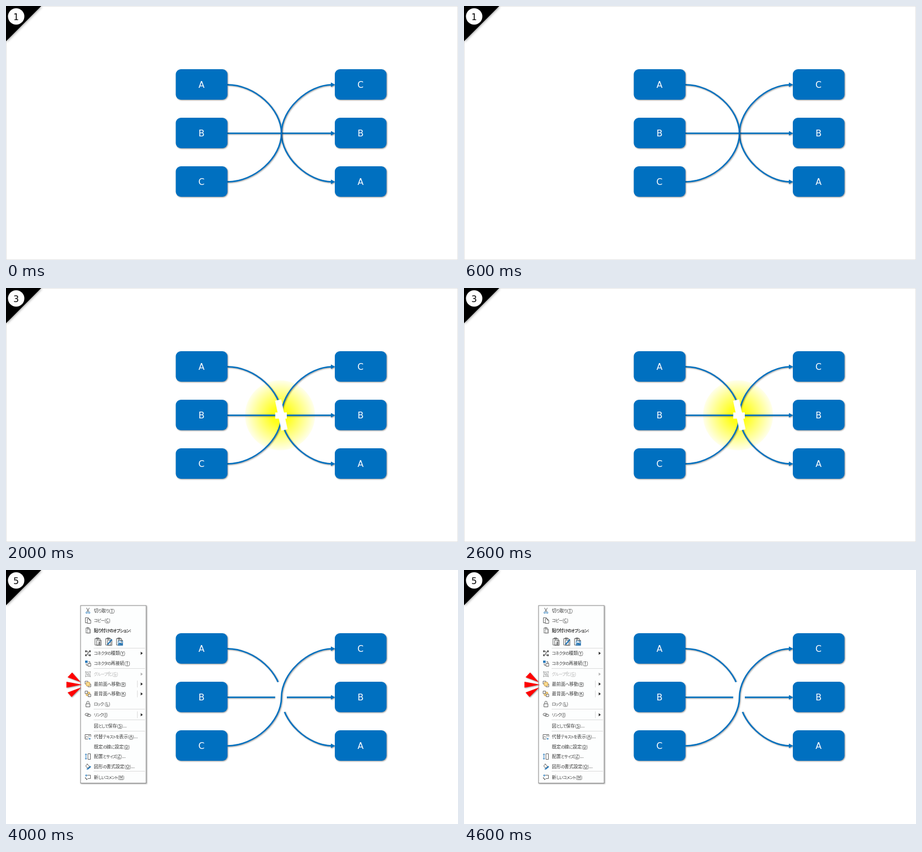
Animation of 800 by 450 pixels, one loop 5 s. Source, as an HTML page:

```html
<!DOCTYPE html>
<html lang="ja">
<head>
<meta charset="utf-8">
<title>Crossing connectors</title>
<style>
html, body { margin: 0; width: 100%; height: 100%; overflow: hidden; background: #fff; }
svg { display: block; width: 800px; height: 450px; }

/* Each step lasts one second of the five second loop. */
.s1-3, .s1-4, .s2, .s2-4, .s3-5, .s4-5, .s5, .num { animation: 5s step-end infinite; }
.s1-3 { animation-name: s1-3; }
.s1-4 { animation-name: s1-4; }
.s2   { animation-name: s2; }
.s2-4 { animation-name: s2-4; }
.s3-5 { animation-name: s3-5; }
.s4-5 { animation-name: s4-5; }
.s5   { animation-name: s5; }
.num  { animation-name: num; animation-delay: calc((var(--n) - 6) * 1s); }
@keyframes s1-3 { 0% { visibility: visible } 60%, 100% { visibility: hidden } }
@keyframes s1-4 { 0% { visibility: visible } 80%, 100% { visibility: hidden } }
@keyframes s2   { 0%, 40%, 100% { visibility: hidden } 20% { visibility: visible } }
@keyframes s2-4 { 0%, 80%, 100% { visibility: hidden } 20% { visibility: visible } }
@keyframes s3-5 { 0% { visibility: hidden } 40%, 100% { visibility: visible } }
@keyframes s4-5 { 0% { visibility: hidden } 60%, 100% { visibility: visible } }
@keyframes s5   { 0% { visibility: hidden } 80%, 100% { visibility: visible } }
@keyframes num  { 0% { visibility: visible } 20%, 100% { visibility: hidden } }

.shadow { filter: drop-shadow(1.4px 1.6px 1px rgba(0, 0, 0, .42)); }
.wire { fill: none; stroke: #0070c0; stroke-width: 2.5; }
.blue { fill: #0070c0; }
.label, .num { font: 15.5px "DejaVu Sans", Verdana, sans-serif; text-anchor: middle; }
.label { fill: #fff; }
.bar { fill: none; stroke-width: 11; }

.menu text { font: 8px "Noto Sans CJK JP", "Noto Sans CJK", sans-serif; fill: #3a3a3a; }
.menu .bold { font-weight: 700; }
.menu .off { fill: #b0b0b0; }
.menu .off-icon { opacity: .45; }
.kana { font-size: 7.2px; font-feature-settings: "palt"; letter-spacing: -.6px; }
.key { text-decoration: underline; }
.rule { stroke: #dcdcdc; fill: none; }
.ico { fill: none; stroke: #555; stroke-width: .9; }
.ico .b { stroke: #1f74b8; }
.ico .y { stroke: #d9a23c; fill: #f8dc94; }
.ico .w { fill: #fff; }
.ico .fb { fill: #1f74b8; stroke: none; }
.ico .fg { fill: #555; stroke: none; }
</style>
</head>
<body>
<svg viewBox="0 0 800 450">
  <defs>
    <radialGradient id="glow">
      <stop offset="0" stop-color="#ff0"/>
      <stop offset=".25" stop-color="#ff0" stop-opacity=".88"/>
      <stop offset="1" stop-color="#ff0" stop-opacity=".08"/>
    </radialGradient>
    <path id="head" class="blue" d="M582.5 0l-7.5-3.9v7.8z"/>
    <g id="rise">
      <path class="wire" d="M392 311.5C440 311.5 487.5 268.5 487.5 225.5S535 139.5 577 139.5"/>
      <use href="#head" y="139.5"/>
    </g>
    <g id="clip">
      <path class="y" d="M-5-5.5H4V6H-5z"/>
      <path class="w" d="M-2.5-7H1.5V-4.5H-2.5z"/>
      <path class="w" d="M-2-2.5H6V6.5H-2z"/>
    </g>
  </defs>

  <rect width="800" height="450" fill="#fff"/>
  <rect class="s1-3" x=".5" y=".5" width="799" height="449" fill="none" stroke="#e4e4e4"/>

  <circle class="s2-4" cx="485" cy="225.5" r="62" fill="url(#glow)"/>

  <g class="shadow">
    <path class="wire" d="M392 139.5C440 139.5 487.5 182.5 487.5 225.5S535 311.5 577 311.5M392 225.5H577"/>
    <use href="#head" y="225.5"/>
    <use href="#head" y="311.5"/>
  </g>
  <g class="s1-4"><use class="shadow" href="#rise"/></g>
  <g id="boxes"></g>

  <path id="bars" class="bar s2" stroke="#000" d="M481.7 198.5L492.9 251.5M476.5 226H497"/>
  <path class="bar s3-5" stroke="#fff" d="M481.7 198.5L492.9 251.5M476.5 226H497"/>
  <g class="s5"><use class="shadow" href="#rise"/></g>

  <g class="shadow" style="filter:drop-shadow(1.5px 1.5px 2px rgba(0,0,0,.4))"><path d="M0 0H62.5L0 62.5z"/></g>
  <circle cx="18" cy="18.5" r="14.5" fill="#fff"/>
  <g id="numbers"></g>

  <g class="menu s4-5">
    <rect x="132" y="63" width="116" height="314.500" fill="#fdfefe" stroke="#8c8c8c" style="filter:drop-shadow(1.5px 1.5px 1px rgba(0,0,0,.4))"/>
    <g id="rows"></g>
  </g>

  <g class="s5"><path class="shadow" fill="#f00" d="M117 181.500L109 190 132 198.500zM107 198V208.500L134 203zM109 217L116 225 133 208z"/></g>
</svg>

<script>
const byId = id => document.getElementById(id);

const box = (x, y, name) =>
  `<rect class="blue shadow" x="${x}" y="${y}" width="91.5" height="54" rx="9"/>
   <text class="label" x="${x + 45.5}" y="${y + 33}">${name}</text>`;
byId("boxes").innerHTML = ["A", "B", "C"].map((name, i, all) =>
  box(300.5, 112 + 86 * i, name) + box(582, 112 + 86 * i, all[2 - i])).join("");

byId("numbers").innerHTML = [1, 2, 3, 4, 5].map(n =>
  `<text class="num" style="--n:${n}" x="18" y="24.5">${n}</text>`).join("");

const icons = {
  cut: `<path d="M-2.5-5L1.5 2.5M2.500-5L-1.5 2.5"/><circle class="b" cx="-2.2" cy="3.6" r="1.4"/><circle class="b" cx="2.2" cy="3.6" r="1.4"/>`,
  copy: `<path d="M-1 4H-4.500V-5H1V-3"/><path class="w" d="M-1-3H2.500L5-.5V5H-1zM2.500-3V-.5H5"/>`,
  paste: `<use href="#clip" transform="scale(.75)"/>`,
  wire: `<path d="M-3-3.500H0V3.500H3M3-3.500L-3 3.500"/><path class="fg" d="M-5-5h3v3h-3zM2-5h3v3H2zM-5 2h3v3h-3zM2 2h3v3H2z"/>`,
  rejoin: `<path class="fb" d="M-5-5h4.500v4h-4.500z"/><path class="w" d="M0 0h5v5H0z"/><path d="M-3 0V3H0M1-3H3.500V0"/>`,
  group: `<path d="M-4-4H4V4H-4z"/><path d="M-2.500-2.500H1V1H-2.500zM-.5-.5H2.700V2.700H-.5z"/><path class="fg" d="M-5-5h2v2h-2zM3-5h2v2H3zM-5 3h2v2h-2zM3 3h2v2H3z"/>`,
  front: `<path d="M-5-5H0V0H-5zM0 0H5V5H0z"/><path class="y" d="M-3-3H3.200V3.200H-3z"/>`,
  back: `<path class="y" d="M-3-3H3.200V3.200H-3z"/><path class="w" d="M-5-5H-.5V-.5H-5zM.5.5H5V5H.5z"/>`,
  lock: `<path d="M-3.500-.5H3.500V5H-3.500zM-2-.5V-3A2 2 0 0 1 2-3V-.5"/>`,
  link: `<rect x="-5" y="-2.500" width="6.500" height="4" rx="2"/><rect x="-1.500" y="-1" width="6.500" height="4" rx="2"/>`,
  alt: `<path d="M5 0V-4H-5V4H0M-5 2L-2-1 1 2"/><circle cx="2" cy="-1.800" r=".7"/><path class="b" d="M1 3.500H5M3 2V5"/>`,
  size: `<path d="M0-5H4.500V5H0z"/><path class="b" d="M-3.500-4.500V4.500M-5-3L-3.500-5-2-3M-5 3L-3.500 5-2 3"/>`,
  format: `<path d="M-4-1L-1-4 3 0-1 3zM-2-5L1-2"/><path class="fb" d="M4.500-1L5.500 1 0 5.500-3 5 0 3z"/>`,
  note: `<path d="M-1-3.500H4.500V2.500H0L-2.500 5V2.500H-4.500V0"/><path class="b" d="M-5-3H-1M-3-5V-1"/>`
};

// [centre y, caption, access key, ending, icon, flags: m = submenu, s = split, b = bold, o = off]
const rows = [
  [72, "切り取り", "T", "", "cut"],
  [89.5, "コピー", "C", "", "copy"],
  [107, "貼り付けのオプション:", "", "", "paste", "b"],
  [147.500, "コネクタの種類", "Y", "", "wire", "m"],
  [165.500, "コネクタの再接続", "T", "", "rejoin"],
  [184.500, "グループ化", "G", "", "group", "mo"],
  [202, "最前面へ移動", "R", "", "front", "ms"],
  [219.500, "最背面へ移動", "K", "", "back", "ms"],
  [237.500, "ロック ", "L", "", "lock"],
  [256.500, "リンク", "I", "", "link", "ms"],
  [276, "図として保存", "S", "..."],
  [295.500, "代替テキストを表示", "A", "...", "alt"],
  [313, "既定の線に設定", "D", ""],
  [330.500, "配置とサイズ", "Z", "...", "size"],
  [348, "図形の書式設定", "O", "...", "format"],
  [367, "新しいコメント", "M", "", "note"]
];

const icon = (x, y, art, cls = "") =>
  `<g class="ico ${cls}" transform="translate(${x} ${y})">${art}</g>`;

function row([y, caption, key, ending, art, flags = ""]) {
  const has = f => flags.includes(f);
  const text = caption.replace(/[ぁ-ヿ]+/g, '<tspan class="kana">$&</tspan>');
  const access = key && `(<tspan class="key">${key}</tspan>)${ending}`;
  return (art ? icon(145, y, icons[art], has("o") ? "off-icon" : "") : "") +
    `<text class="${has("b") ? "bold" : ""} ${has("o") ? "off" : ""}" x="155.5" y="${y + 2.9}">${text}${access}</text>` +
    (has("m") ? `<path d="M238.5 ${y - 2.7}l3.5 2.7l-3.5 2.7z" fill="${has("o") ? "#b0b0b0" : "#222"}"/>` : "") +
    (has("s") ? `<path class="rule" d="M232.5 ${y - 6}v12"/>` : "");
}

const clip = '<use href="#clip"/>';
const pasteOptions = [
  `${clip}<text x="-.3" y="5" stroke="none">a</text>`,
  `${clip}<path class="b" stroke-width="2" d="M6-4L0 3"/><path class="fb" d="M-1 2L1.500 4-3 6z"/>`,
  `${clip}<path class="fb" d="M-1 5.500V3L1 1 3 3 4 2 5.500 3.500V5.500z"/><path class="b" d="M-2-1H6V6.500H-2z"/>`
].map((art, i) => icon(162.5 + 19 * i, 127, art)).join("");

const rules = [139, 175, 247, 266, 286, 357].map(y =>
  `<path class="rule" d="M155 ${y - .5}H246"/>`).join("");

byId("rows").innerHTML = rules + rows.map(row).join("") + pasteOptions;
</script>
</body>
</html>
```
